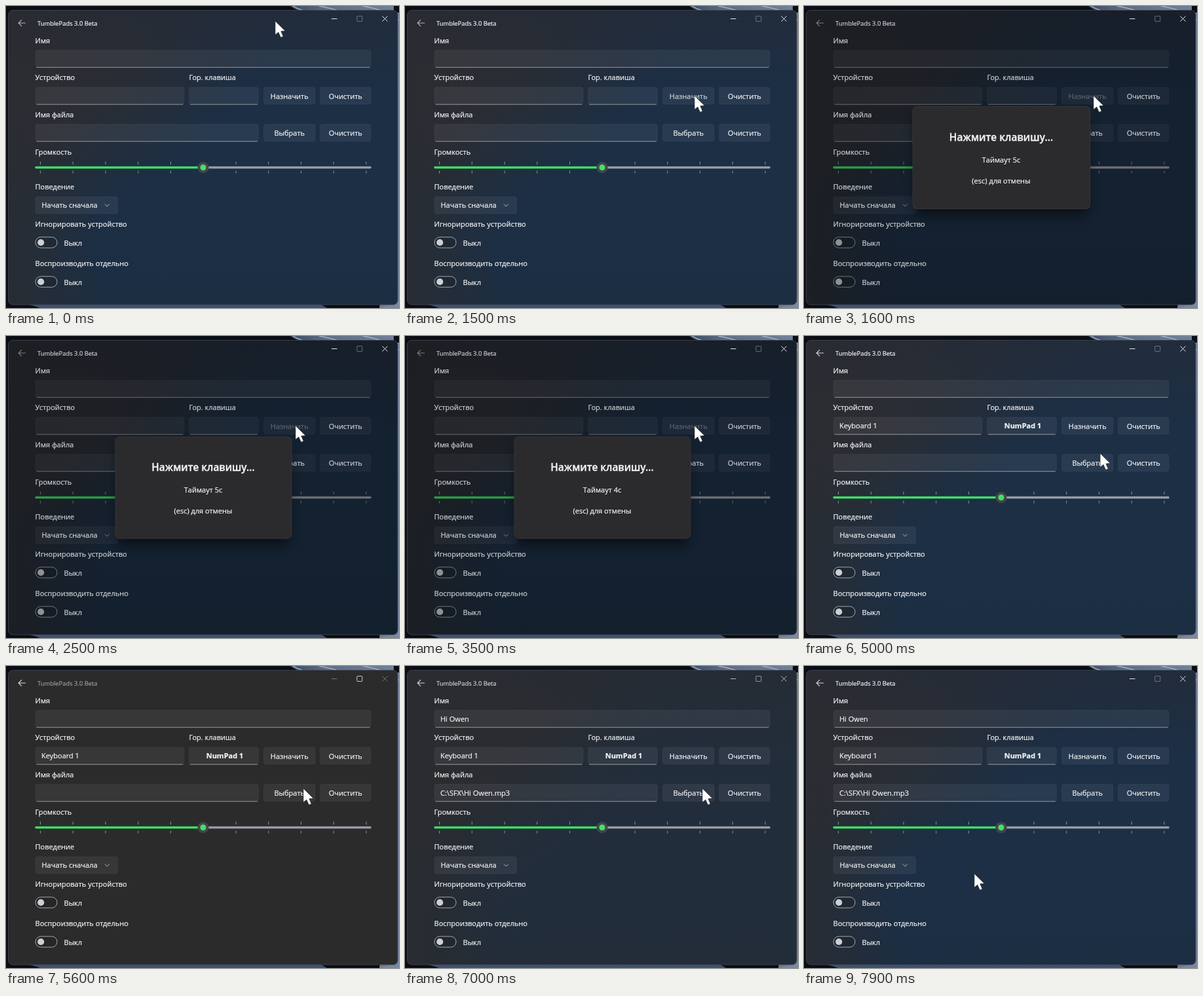
Recreate the animation shown at these times as an HTML page. Size 600 px wide and 461 px high, loop 8 s.

```html
<!DOCTYPE html>
<html lang="ru">
<head>
<meta charset="utf-8">
<title>Sound settings</title>
<style>
  html, body { margin: 0; width: 100%; height: 100%; overflow: hidden; background: #0a0c13; }
  svg { display: block; width: 600px; height: 461px; }
  text {
    font: 11px "Open Sans", "Noto Sans", sans-serif; white-space: pre;
    fill: #f2f3f5; stroke: #f2f3f5; stroke-width: .22;
  }
  .mid { text-anchor: middle; }
  .title { font-size: 9.4px; }
  .bold { font-weight: 700; }
  .head { font-size: 15.4px; font-weight: 600; stroke-width: .35; }
  .line { fill: none; stroke: #e6e8ec; }
</style>
</head>
<body>
<svg viewBox="0 0 600 461">
  <defs>
    <radialGradient id="mica" gradientUnits="userSpaceOnUse" cx="0" cy="0" r="1"
      gradientTransform="translate(70 70) rotate(-32) scale(390 260)">
      <stop offset="0" stop-color="#2d2d30"/>
      <stop offset=".45" stop-color="#282d35"/>
      <stop offset=".8" stop-color="#1f2e40"/>
      <stop offset="1" stop-color="#1c2f45"/>
    </radialGradient>
    <linearGradient id="shade" x1="0" y1="0" x2="0" y2="1">
      <stop offset="0" stop-color="#242a36" stop-opacity=".7"/>
      <stop offset=".3" stop-color="#242a36" stop-opacity="0"/>
      <stop offset=".75" stop-color="#1b2d40" stop-opacity="0"/>
      <stop offset="1" stop-color="#1b2d40" stop-opacity=".8"/>
    </linearGradient>
    <linearGradient id="side">
      <stop offset="0" stop-color="#2a2c31" stop-opacity=".9"/>
      <stop offset=".25" stop-color="#2a2c31" stop-opacity="0"/>
    </linearGradient>
    <linearGradient id="petal">
      <stop offset="0" stop-color="#3d4d66"/>
      <stop offset=".35" stop-color="#5f6f87"/>
      <stop offset="1" stop-color="#71829b"/>
    </linearGradient>
    <filter id="blur" x="-20%" y="-20%" width="140%" height="150%">
      <feGaussianBlur stdDeviation="9"/>
    </filter>
    <clipPath id="frame"><rect x="3.5" y="6.5" width="594.5" height="449.5" rx="7"/></clipPath>
  </defs>

  <!-- desktop -->
  <rect width="600" height="461" fill="#0b0d15"/>
  <path d="M434 0Q446 10 470 10H600V461H570Q594 300 592 0Z" fill="url(#petal)"/>
  <path d="M438 0Q450 8 468 9M478 0Q500 4 512 9M545 0Q580 6 600 22" fill="none" stroke="#a3b0c3" stroke-width="1.5"/>
  <path d="M26 455Q40 456 52 461H490L480 455Z" fill="#3d5272"/>
  <path d="M570 461Q590 458 600 448V461Z" fill="#7888a2"/>

  <!-- window -->
  <g clip-path="url(#frame)">
    <rect width="600" height="461" fill="url(#mica)"/>
    <rect width="600" height="461" fill="url(#shade)"/>
    <rect width="600" height="461" fill="url(#side)"/>
    <rect id="plain" width="600" height="461" fill="#2b2b2c"/>
    <g id="back"><path class="line" stroke-width="1.2" d="M30 26H19.5M24 21.2L19.2 26L24 30.8"/></g>
    <g id="form"></g>
    <rect id="smoke" width="600" height="461" fill="#000"/>
    <g id="labels">
      <text id="title" class="title" x="48" y="29.5">TumblePads 3.0 Beta</text>
    </g>
    <g id="dialog">
      <rect x="170" y="166" width="262" height="152" rx="8" fill="#000" opacity=".55" filter="url(#blur)"/>
      <rect x="167" y="154" width="269" height="155" rx="6.5" fill="#2b2a2c" stroke="#37373b" stroke-width="1"/>
      <text class="head mid" x="301" y="206">Нажмите клавишу...</text>
      <text id="timeout" class="mid" x="301" y="239"></text>
      <text class="mid" x="301" y="271">(esc) для отмены</text>
    </g>
    <path id="minClose" class="line" d="M497 19.5H505.5M574.5 15.5L582.5 23.5M582.5 15.5L574.5 23.5"/>
    <rect id="maxBox" class="line" x="535.8" y="15.5" width="8" height="8" rx="1"/>
  </g>
  <rect x="3.5" y="6.5" width="594.5" height="449.5" rx="7" fill="none" stroke="#414853" stroke-opacity=".8"/>
  <path id="cursor" d="M0 0V21L4.9 17L8.5 25L12.2 23.4L8.8 15.6L15.2 15Z"
    fill="#fff" stroke="#20242c" stroke-width=".6" stroke-linejoin="round"/>
</svg>
<script>
const LOOP = 8000;
const $ = id => document.getElementById(id);

function add(parent, tag, attrs, label = '') {
  const el = document.createElementNS('http://www.w3.org/2000/svg', tag);
  for (const key in attrs) el.setAttribute(key, attrs[key]);
  el.textContent = label;
  return $(parent).appendChild(el);
}
const shape = (tag, attrs) => add('form', tag, attrs);
const text = (x, y, label, cls = '') => add('labels', 'text', { x, y, class: cls }, label);
const box = (x, y, w, h = 27) => shape('rect', {
  x: x + .5, y: y + .5, width: w - 1, height: h - 1, rx: 3.5,
  fill: '#fff', 'fill-opacity': .06, stroke: '#fff', 'stroke-opacity': .045
});

function field(x, y, w) {
  box(x, y, w);
  shape('path', { d: `M${x + 2.5} ${y + 26.7}H${x + w - 2.5}`, stroke: '#94979c', 'stroke-linecap': 'round' });
}
function button(x, y, w, label) {
  box(x, y, w);
  return text(x + w / 2, y + 18, label, 'mid');
}
function toggle(y) {
  shape('rect', { x: 45, y: y - 8.2, width: 33, height: 16.4, rx: 8.2, fill: '#000', 'fill-opacity': .12, stroke: '#a3a7ad' });
  shape('circle', { cx: 53.2, cy: y, r: 5.1, fill: '#cdd0d4' });
  text(88.5, y + 5, 'Выкл');
}
function slider(y) {
  for (let i = 0; i < 11; i++) {
    const x = 52.5 + i * 49.75;
    if (i !== 5) shape('path', { d: `M${x} ${y - 9}v4.5M${x} ${y + 5}v4`, stroke: '#8d929a' });
  }
  const rail = (x1, x2, stroke) => shape('path', {
    d: `M${x1} ${y}H${x2}`, stroke, 'stroke-width': 3.5, 'stroke-linecap': 'round'
  });
  rail(302, 556, '#999ca3');
  rail(46, 300, '#3edc66');
  shape('circle', { cx: 301, cy: y, r: 8.6, fill: '#454548' });
  shape('circle', { cx: 301, cy: y, r: 4.5, fill: '#40e269' });
}

[[56.5, 'Имя'], [113, 'Устройство'], [170, 'Имя файла'], [227, 'Громкость'], [279.5, 'Поведение'],
 [337, 'Игнорировать устройство'], [397, 'Воспроизводить отдельно']]
  .forEach(([y, label]) => text(44.5, y, label));
text(279.5, 113, 'Гор. клавиша');

field(44.5, 67, 513);
field(44.5, 123.5, 228);
field(279, 123.5, 107);
field(44.5, 180, 341.5);
const assign = button(393, 123.5, 79.5, 'Назначить');
button(479, 123.5, 78.5, 'Очистить');
button(393, 180, 79.5, 'Выбрать');
button(479, 180, 78.5, 'Очистить');
slider(246.5);
box(44.5, 290.5, 126.5);
text(54.5, 308, 'Начать сначала');
shape('path', { d: 'M151 302.5l3.3 3.3l3.3-3.3', class: 'line', 'stroke-opacity': .75 });
toggle(361);
toggle(421);

const nameValue = text(54, 84.5, 'Hi Owen');
const deviceValue = text(54, 141, 'Keyboard 1');
const keyValue = text(334, 141, 'NumPad 1', 'mid bold');
const fileValue = text(54, 197.5, 'C:\\SFX\\Hi Owen.mp3');

// start, end, x and y at the end
const moves = [[0, 0, 411, 23], [900, 1200, 442, 137], [4700, 5100, 454, 187], [7100, 7750, 260, 317]];
const ramp = (t, from, to) => Math.min(1, Math.max(0, (t - from) / (to - from)));
const smooth = p => p * p * (3 - 2 * p);
const opacity = (el, value) => el.setAttribute('opacity', value);

function cursorAt(t) {
  let [, , x, y] = moves[0];
  for (const [from, to, endX, endY] of moves.slice(1)) {
    const p = smooth(ramp(t, from, to));
    x += (endX - x) * p;
    y += (endY - y) * p;
  }
  return `translate(${x} ${y})`;
}

function draw(t) {
  const open = t >= 1520 && t < 3600;
  const assigned = t >= 3600;
  const picked = t >= 6900;

  // the dialog settles from slightly oversized
  const scale = 1 + .05 * (1 - ramp(t, 1520, 1680)) ** 3;
  const shown = open ? ramp(t, 1520, 1590) : 0;
  opacity($('dialog'), shown);
  $('dialog').setAttribute('transform', `translate(301 231.5) scale(${scale}) translate(-301 -231.5)`);
  opacity($('smoke'), .3 * shown);
  opacity($('labels'), 1 - .18 * shown);
  $('timeout').textContent = `Таймаут ${t < 2600 ? 5 : 4}с`;
  opacity(assign, open ? .35 : t >= 1450 && t < 1520 ? .8 : 1);

  const idle = ramp(t, 5300, 5550) - ramp(t, 6850, 7100);
  opacity($('plain'), idle);
  opacity($('title'), 1 - .45 * idle);
  opacity($('minClose'), 1 - .62 * idle);
  opacity($('maxBox'), .38 + .47 * idle);
  opacity($('back'), assigned ? .9 : .7);

  opacity(deviceValue, +assigned);
  opacity(keyValue, +assigned);
  opacity(nameValue, +picked);
  opacity(fileValue, +picked);
  $('cursor').setAttribute('transform', cursorAt(t));
}

const start = performance.now();
function tick() {
  draw((performance.now() - start) % LOOP);
  requestAnimationFrame(tick);
}
tick();
</script>
</body>
</html>
```
